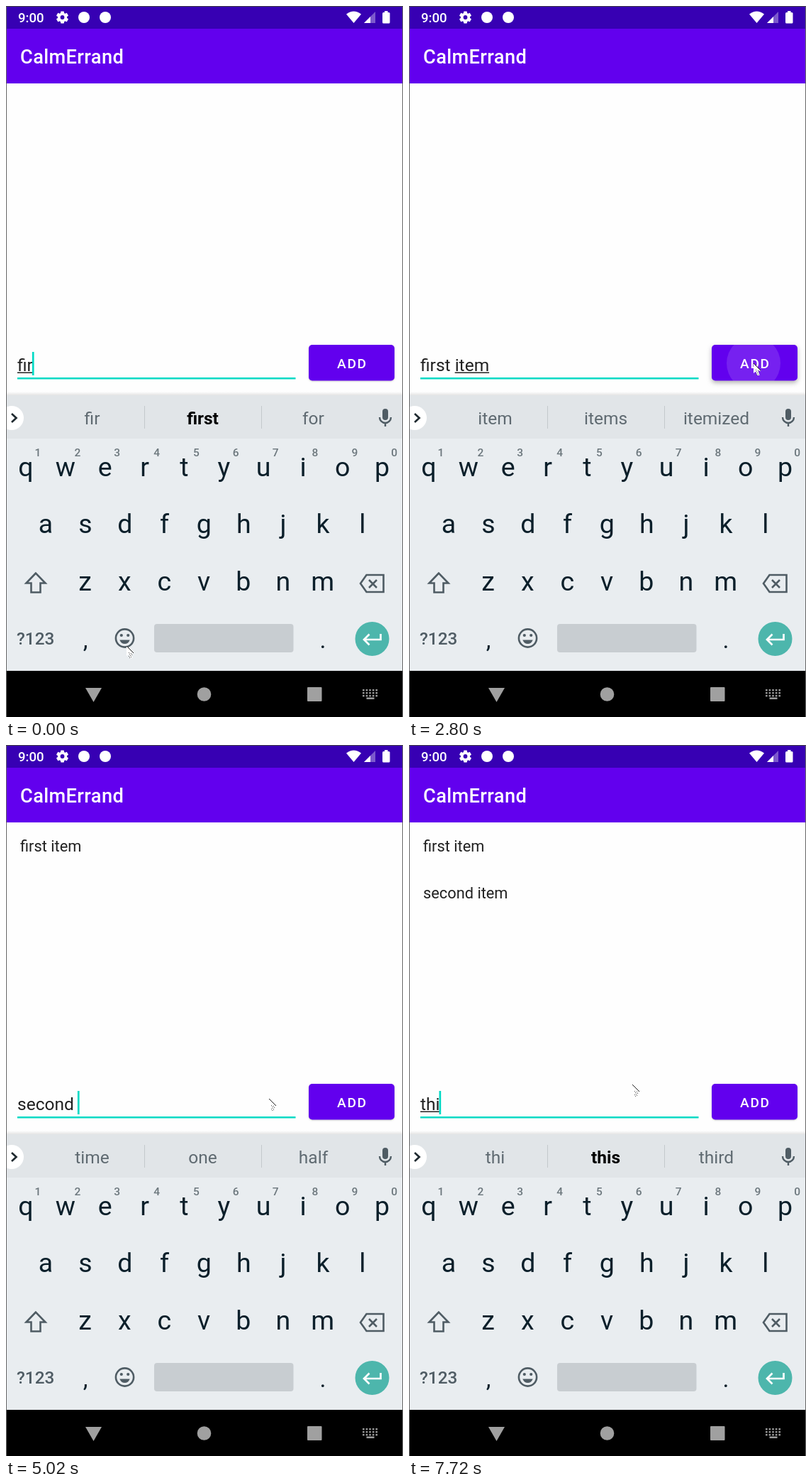
These frames come from a looping animation (560x1001 px, 8000 ms). An HTML page with a canvas:

```html
<!DOCTYPE html>
<html lang="en">
<head>
<meta charset="utf-8">
<title>To-do list</title>
<style>
html, body { margin: 0; width: 100%; height: 100%; overflow: hidden; background: #fefefe; }
canvas { display: block; }
</style>
</head>
<body>
<canvas id="stage" width="560" height="1001"></canvas>
<script>
const g = document.getElementById('stage').getContext('2d');
const LOOP = 8000, TEAL = '#03dac5', INK = '#4f5c64';

// [start, end, count] of evenly spaced screen updates
const bursts = [[0, 0, 1], [120, 240, 2], [650, 650, 1], [950, 1330, 4], [1860, 2800, 7], [2930, 3830, 7],
  [4130, 5020, 6], [5280, 5530, 2], [6070, 6800, 6], [7080, 7080, 1], [7480, 7720, 3]];
const ticks = bursts.flatMap(([a, b, n]) => Array.from({ length: n }, (_, i) => a + (n > 1 ? (b - a) * i / (n - 1) : 0)));

// [time, field text, suggestions]; * marks the bold suggestion
const typing = [
  [0, 'fir', 'fir *first for'],
  [120, 'firs', 'firs *first fits'],
  [240, 'first', 'first firstly firsthand'],
  [650, 'first ', 'time day thing'],
  [950, 'first i', 'I in is'],
  [1070, 'first it', "it it's its"],
  [1200, 'first ite', 'ite *item it'],
  [1330, 'first item', 'item items itemized'],
  [2930, '', 'thanks I we'],
  [4130, 's', 's *so she'],
  [4300, 'se', 'se *see set'],
  [4480, 'sec', 'sec *second SEC'],
  [4660, 'seco', 'seco *second secondary'],
  [4840, 'second', 'second seconds secondary'],
  [5020, 'second ', 'time one half'],
  [5280, 'second it', "it it's its"],
  [5530, 'second item', 'item items itemized'],
  [6500, '', 'thanks I we'],
  [7480, 't', 't *to the'],
  [7600, 'th', 'th *the there'],
  [7720, 'thi', 'thi *this third']
];
const caretOff = [[1860, 2320], [2800, 2930], [3450, 3830], [6070, 6500], [7080, 7480]];
// [start, end, x, y] of pointer moves
const moves = [[0, 0, 170, 901], [1860, 2640, 486, 503], [3080, 3530, 371, 498], [6070, 6360, 486, 503], [6508, 6800, 315, 478]];
const presses = [[2710, 2930], [6272, 6508]];

const clamp = v => Math.max(0, Math.min(1, v));
const ease = v => v * v * (3 - 2 * v);
const within = (t, [a, b]) => t >= a && t < b;

function rect(x, y, w, h, color, r = 0) {
  g.fillStyle = color;
  g.beginPath();
  g.roundRect(x, y, w, h, r);
  g.fill();
}
function disc(x, y, r, color) {
  g.fillStyle = color;
  g.beginPath();
  g.arc(x, y, r, 0, 7);
  g.fill();
}
function fill(d, color) {
  g.fillStyle = color;
  g.fill(new Path2D(d));
}
function line(d, color, w = 2.7, cap = 'butt') {
  g.strokeStyle = color;
  g.lineWidth = w;
  g.lineCap = cap;
  g.stroke(new Path2D(d));
}
function text(s, x, y, size, color, weight = 400, align = 'left', spacing = 0) {
  g.font = `${weight} ${size}px Roboto, sans-serif`;
  g.textAlign = align;
  g.letterSpacing = spacing + 'px';
  g.fillStyle = color;
  g.fillText(s, x, y);
  g.letterSpacing = '0px';
}

function drawHeader() {
  rect(0, 0, 560, 1001, '#fefefe');
  rect(0, 0, 560, 32, '#3700b3');
  rect(0, 32, 560, 77, '#6200ee');
  text('9:00', 17, 23, 18.6, '#fff', 500);
  for (let i = 0; i < 6; i++) {
    g.save();
    g.translate(79.5, 16);
    g.rotate(i * Math.PI / 3);
    rect(-2.5, -8.6, 5, 6, '#fff', 1);
    g.restore();
  }
  disc(79.5, 16, 6.6, '#fff');
  disc(79.5, 16, 2.9, '#3700b3');
  disc(110, 16, 8, '#fff');
  disc(140, 16, 8, '#fff');
  fill('M490.5 24L480 11.5Q490.5 3.5 501 11.5Z', '#fff');
  fill('M505 24H521V8Z', 'rgba(255,255,255,.35)');
  fill('M505 24H514V15Z', '#fff');
  rect(531, 9, 10.5, 15.5, '#fff', 1.5);
  rect(534, 7, 4.5, 3, '#fff');
  text('CalmErrand', 20, 81, 27.25, '#fff', 500, 'left', 0.34);
}

function drawKeyboard(words) {
  const shade = g.createLinearGradient(0, 543, 0, 548);
  shade.addColorStop(0, 'rgba(0,0,0,0)');
  shade.addColorStop(1, 'rgba(0,0,0,.1)');
  rect(0, 543, 560, 5, shade);
  rect(0, 548, 560, 62, '#e1e5e8');
  rect(0, 609, 560, 327, '#e9edf0');
  rect(195, 563, 1, 32, '#c3c8cb');
  rect(360, 563, 1, 32, '#c3c8cb');
  disc(8, 580, 17, '#fff');
  line('M8 574L14.5 580L8 586', '#1f2a30');
  words.split(' ').forEach((w, i) => {
    const bold = w[0] === '*';
    text(bold ? w.slice(1) : w, 121.5 + 156 * i, 588.5, 24.5, bold ? '#000' : '#5f6a71', bold ? 700 : 400, 'center');
  });
  line('M535 571V579', INK, 8, 'round');
  line('M527 579A8 8 0 0 0 543 579M535 587V592', INK, 2.4);

  ['qwertyuiop', 'asdfghjkl', 'zxcvbnm'].forEach((row, r) => {
    [...row].forEach((c, i) => {
      const x = [28, 56, 111.5][r] + 55.85 * i;
      text(c, x, 662 + 80.3 * r, 37.5, '#0b1f2a', 400, 'center');
      if (!r) text((i + 1) % 10, x + 17, 634, 15.5, '#6c777d', 500, 'center');
    });
  });
  line('M42 798.5L28.5 812.5H35.5V825.5H48.5V812.5H55.5Z', INK, 2.6);
  line('M508.5 801H532.5V825H508.5L500 813ZM512 808L523 819M523 808L512 819', INK, 2.6);
  text('?123', 15, 898.5, 24.3, INK, 500);
  text(',', 112, 904, 34, '#0b1f2a', 400, 'center');
  text('.', 447, 904, 34, '#0b1f2a', 400, 'center');
  line('M154.9 890a12.6 12.6 0 1 0 25.2 0a12.6 12.6 0 1 0 -25.2 0', INK, 2.6);
  disc(162.8, 886, 2.1, INK);
  disc(172.2, 886, 2.1, INK);
  fill('M160.3 892.5H174.7Q172.5 898 167.5 898Q162.5 898 160.3 892.5Z', INK);
  rect(209, 870, 196.5, 40, '#c8cdd1', 4);
  disc(516.5, 891, 24, '#4db6ac');
  line('M528.5 884V892H506M512.5 884.5L505 892L512.5 899.5', '#fff');

  rect(0, 936, 560, 65, '#000');
  fill('M112 960H135L123.5 980Z', '#a0a0a0');
  disc(279.5, 969, 9.8, '#a0a0a0');
  rect(425, 959, 20.5, 20, '#a0a0a0', 1);
  for (let i = 0; i < 15; i++) rect(503 + i % 5 * 4.6, 962 + Math.floor(i / 5) * 4, 2.6, 2.4, '#9a9a9a');
  rect(508.5, 973.5, 11, 2.5, '#9a9a9a');
}

function drawField(value, caret) {
  const x = 16, size = 24.525;
  text(value || 'Add a task', x, 514, size, value ? '#212121' : '#9e9e9e');
  const width = s => g.measureText(s).width;
  const end = value ? width(value) : 0;
  const start = width(value.slice(0, value.lastIndexOf(' ') + 1));
  if (end > start) rect(x + start, 515.5, end - start, 1.5, '#212121');
  rect(16, 523, 392.5, 2.6, TEAL);
  if (caret) rect(Math.max(16, x + end - 1), 487, 2.7, 33, TEAL);
}

function drawButton(t) {
  const press = presses.find(([a, b]) => t >= a && t < b + 300);
  const fade = press ? 1 - clamp((t - press[1]) / 300) : 0;
  g.save();
  g.shadowColor = `rgba(0,0,0,${0.2 + 0.1 * fade})`;
  g.shadowBlur = 2 + 4 * fade;
  g.shadowOffsetY = 1 + 2 * fade;
  rect(427, 477, 121, 50.5, '#6200ee', 5);
  g.restore();
  if (press) {
    g.save();
    g.beginPath();
    g.roundRect(427, 477, 121, 50.5, 5);
    g.clip();
    disc(486, 503, Math.min(70, 20 + 0.2 * (t - press[0])), `rgba(255,255,255,${0.13 * fade})`);
    g.restore();
  }
  text('ADD', 467, 510, 19.07, '#fff', 500, 'left', 1.7);
}

function drawPointer(t) {
  let x = 0, y = 0;
  for (const [a, b, tx, ty] of moves) {
    if (t < a) break;
    const k = b > a ? ease(clamp((t - a) / (b - a))) : 1;
    x += (tx - x) * k;
    y += (ty - y) * k;
  }
  g.save();
  g.translate(Math.round(x), Math.round(y));
  fill('M0 0V14L3 11.5L5.5 17H8.5L6.5 10.5H10.5Z', '#fff');
  line('M0 0L10 10', '#222', 1);
  for (let i = 0; i < 8; i++) rect(3 + i * 3 % 5, 9 + i, 1, 1, '#555');
  g.restore();
}

function draw(now) {
  const time = now % LOOP;
  const t = ticks.findLast(v => v <= time + 0.01);
  const [, value, words] = typing.findLast(s => s[0] <= t + 0.01);
  drawHeader();
  if (t >= 2930) text('first item', 20, 150, 21.8, '#212121');
  if (t >= 6500) text('second item', 20, 216, 21.8, '#212121');
  drawField(value, !caretOff.some(r => within(t, r)));
  drawButton(t);
  drawKeyboard(words);
  drawPointer(t);
  rect(0, 0, 1, 1001, '#666');
  rect(559, 0, 1, 1001, '#666');
  rect(0, 0, 560, 1, '#444');
}

const begin = performance.now();
function loop() {
  draw(performance.now() - begin);
  requestAnimationFrame(loop);
}
loop();
</script>
</body>
</html>
```
